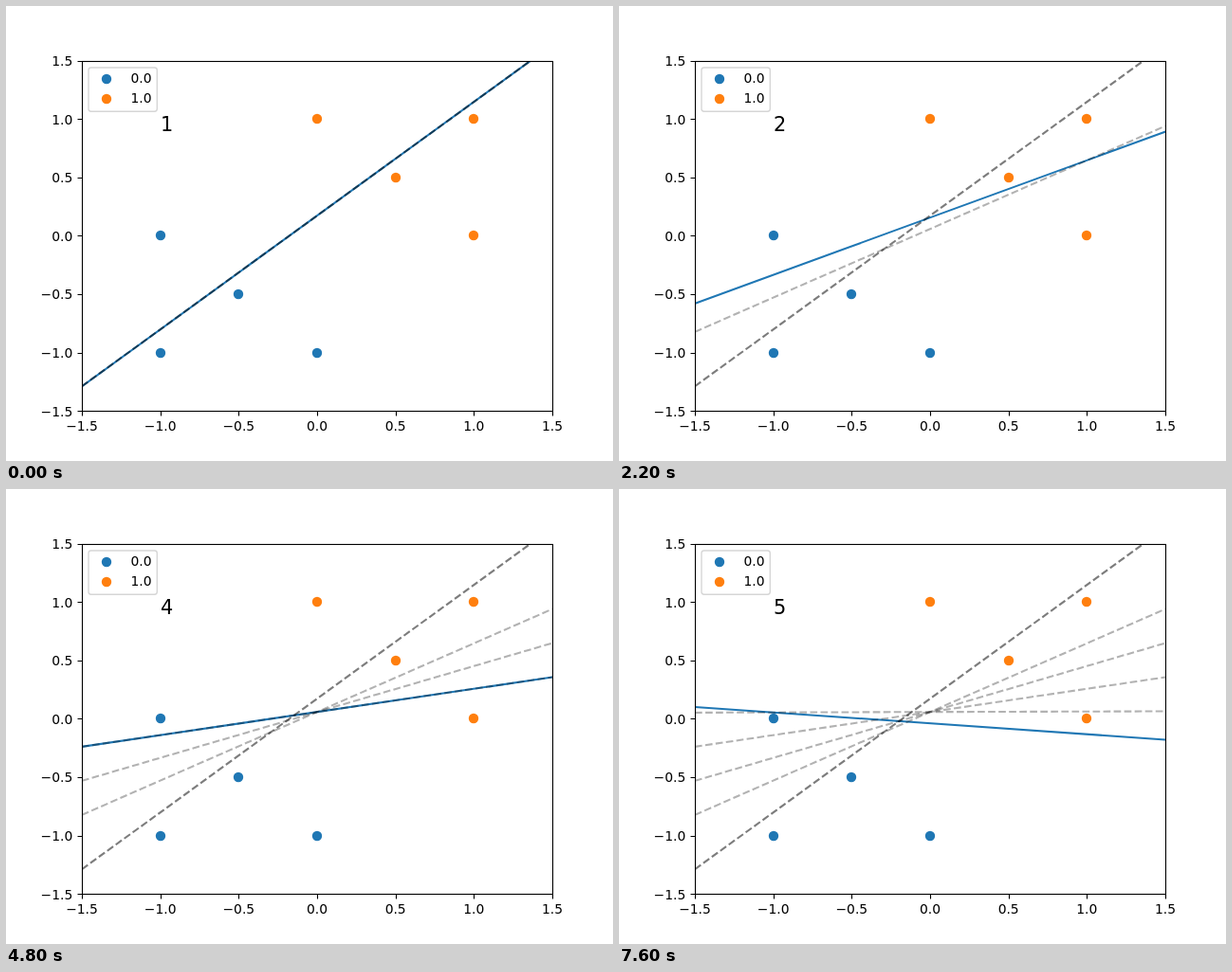
These frames come from a looping animation (640 by 480 pixels, 8 s). An HTML page:

```html
<!DOCTYPE html>
<html lang="en">
<head>
<meta charset="utf-8">
<title>Perceptron training</title>
<style>
  html, body { margin: 0; width: 100%; height: 100%; overflow: hidden; background: #fff; }
  svg { display: block; }
  text { font: 13.89px "DejaVu Sans", sans-serif; }
  .epoch { font-size: 20.83px; }
</style>
</head>
<body>
<svg id="plot" width="640" height="480" viewBox="0 0 640 480"></svg>
<script>
const STEP_MS = 200, EPOCHS = 5;
const LINE_WIDTH = 2.083;
const COLORS = ['#1f77b4', '#ff7f0e'];
// Samples in training order: x, y, class
const SAMPLES = [
  [-0.5, -0.5, 0], [0, -1, 0], [-1, -1, 0], [-1, 0, 0],
  [0, 1, 1], [1, 1, 1], [1, 0, 1], [0.5, 0.5, 1]
];
const plot = document.getElementById('plot');
const px = x => 328 + x * 496 / 3;
const py = y => 242.4 - y * 123.2;

function add(parent, tag, attrs, content = '') {
  const node = document.createElementNS('http://www.w3.org/2000/svg', tag);
  for (const name in attrs) node.setAttribute(name, attrs[name]);
  node.textContent = content;
  return parent.appendChild(node);
}

function addDot(x, y, kind) {
  add(plot, 'circle', { cx: x, cy: y, r: 5.21, fill: COLORS[kind] });
}

// Runs the perceptron rule; returns the decision line shown at every step
function train() {
  let w1 = -9.04, w2 = 9.28, bias = -1.6;
  const lines = [];
  for (let epoch = 0; epoch < EPOCHS; epoch++) {
    for (const [x, y, target] of SAMPLES) {
      const error = target - (w1 * x + w2 * y + bias > 0 ? 1 : 0);
      w1 += error * x;
      w2 += error * y;
      bias += error;
      const lineY = at => py(-(w1 * at + bias) / w2);
      lines.push(`M80 ${lineY(-1.5)}L576 ${lineY(1.5)}`);
    }
  }
  return lines;
}

const lines = train();

for (const [x, y, kind] of SAMPLES) addDot(Math.round(px(x)), Math.round(py(y)), kind);

const clip = add(plot, 'clipPath', { id: 'axes' });
add(clip, 'rect', { x: 80, y: 58, width: 496, height: 369 });
const area = add(plot, 'g', { 'clip-path': 'url(#axes)', fill: 'none', 'stroke-width': LINE_WIDTH });
const boundary = add(area, 'path', { stroke: COLORS[0], 'stroke-linecap': 'square' });

function addTrail(epoch) {
  return add(area, 'path', {
    d: lines[epoch * SAMPLES.length], stroke: '#000', 'stroke-opacity': 0.3,
    'stroke-dasharray': `${3.7 * LINE_WIDTH} ${1.6 * LINE_WIDTH}`
  });
}
addTrail(0); // the starting line is laid down twice, so it is darker
const trails = Array.from({ length: EPOCHS }, (_, epoch) => addTrail(epoch));

// Axes
const frame = { fill: 'none', stroke: '#000', 'stroke-width': 1.11 };
add(plot, 'rect', { x: 80.5, y: 58.5, width: 496, height: 369, ...frame });
for (let i = -3; i <= 3; i++) {
  const value = i / 2;
  const label = value.toFixed(1).replace('-', '\u2212');
  const x = Math.round(px(value)) + 0.5, y = Math.round(py(value)) + 0.5;
  add(plot, 'path', { d: `M${x} 427.5v5M80.5 ${y}h-5`, ...frame });
  add(plot, 'text', { x: px(value), y: 448, 'text-anchor': 'middle' }, label);
  add(plot, 'text', { x: 70.3, y: Math.round(py(value) + 5.3), 'text-anchor': 'end' }, label);
}

// Legend
add(plot, 'rect', {
  x: 87, y: 65, width: 72.3, height: 46.3, rx: 2.78,
  fill: '#fff', stroke: '#d6d6d6', 'stroke-width': 1.39
});
['0.0', '1.0'].forEach((label, kind) => {
  addDot(106, 77 + 21 * kind, kind);
  add(plot, 'text', { x: 131.5, y: 81 + 21 * kind }, label);
});

const counter = add(plot, 'text', { x: 163, y: 132, class: 'epoch' });

function draw(now) {
  const step = Math.floor(now / STEP_MS) % lines.length;
  const epoch = Math.floor(step / SAMPLES.length);
  boundary.setAttribute('d', lines[step]);
  trails.forEach((trail, i) => trail.setAttribute('visibility', i <= epoch ? 'visible' : 'hidden'));
  counter.textContent = epoch + 1;
}

const start = performance.now();
function tick() {
  draw(performance.now() - start);
  requestAnimationFrame(tick);
}
tick();
</script>
</body>
</html>
```
